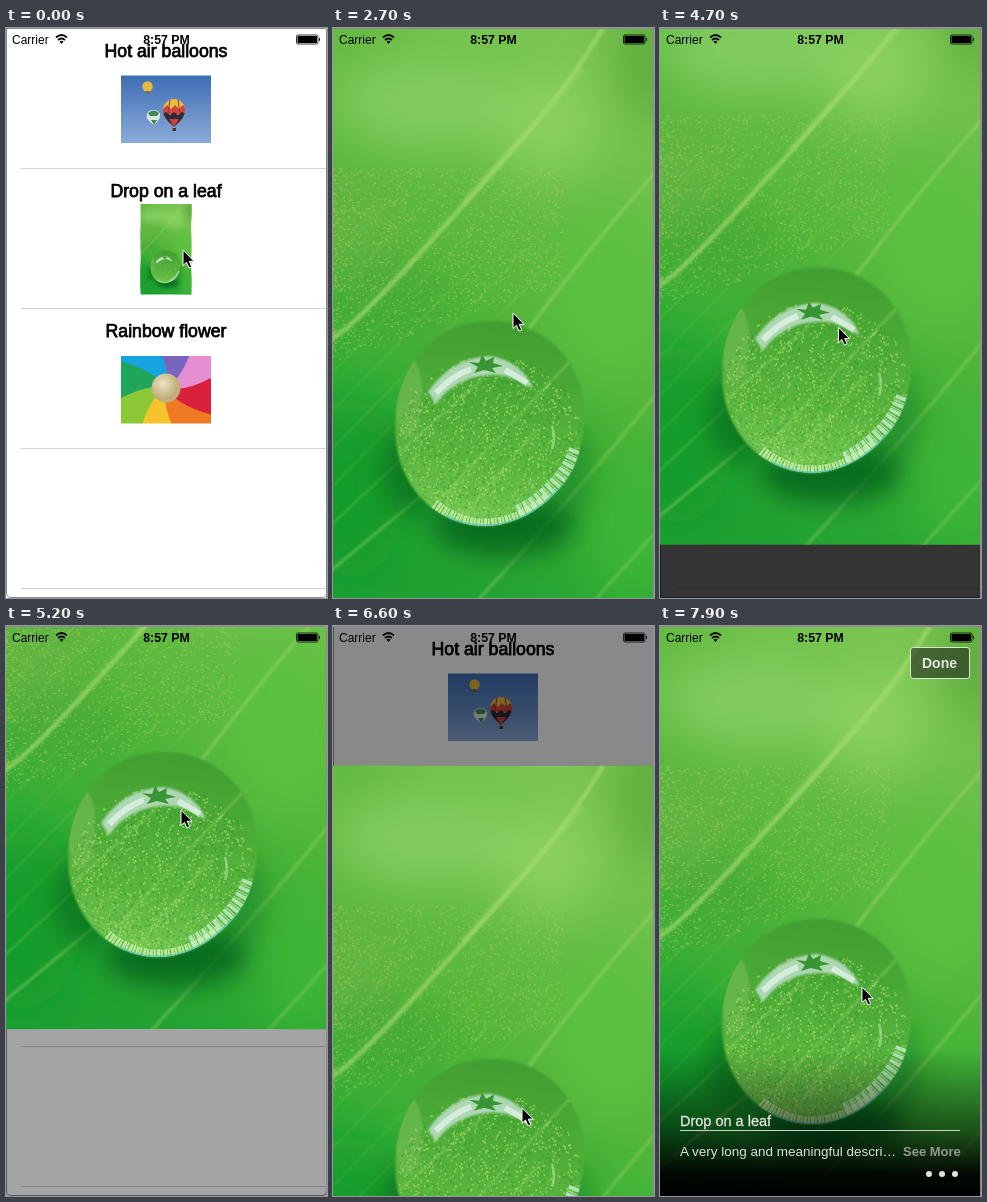
Recreate the animation shown at these times as an HTML page. Size 321x570 px, loop 8000 ms.

```html
<!DOCTYPE html>
<html lang="en">
<head>
<meta charset="utf-8">
<title>Photo viewer</title>
<style>
html, body { margin: 0; height: 100%; overflow: hidden; background: #fff; }
svg { display: block; width: 100vw; height: 100vh; }
text { font-family: "Liberation Sans", Arial, sans-serif; }
.row { font-size: 17.7px; text-anchor: middle; stroke: #000; stroke-width: .75px; }
.bold { font-weight: bold; }
</style>
</head>
<body>
<svg viewBox="0 0 321 570">
  <defs>
    <clipPath id="page"><rect width="320" height="570"/></clipPath>
    <clipPath id="sky"><rect x="115" y="47.5" width="90" height="67.5"/></clipPath>
    <clipPath id="wheelBox"><rect x="115" y="328" width="90" height="67.5"/></clipPath>
    <path id="drop" d="M157 293C213 293 251 335 251 385C251 425 240 450 215 472C195 490 170 499 148 498C100 495 62 455 62 400C62 340 100 293 157 293"/>
    <clipPath id="dropClip"><use href="#drop"/></clipPath>
    <clipPath id="bigBalloon"><path d="M168 99Q156 89 157 82A11 11 0 0 1 179 82Q180 89 168 99"/></clipPath>
    <filter id="soft" x="-50%" y="-50%" width="200%" height="200%"><feGaussianBlur stdDeviation="24"/></filter>
    <filter id="shadow" x="-50%" y="-50%" width="200%" height="200%"><feGaussianBlur stdDeviation="13"/></filter>
    <filter id="mild" x="-50%" y="-50%" width="200%" height="200%"><feGaussianBlur stdDeviation="1.3"/></filter>
    <linearGradient id="green" x1=".7" y1="0" x2=".35" y2="1">
      <stop stop-color="#7cc652"/><stop offset=".45" stop-color="#58b83c"/>
      <stop offset=".75" stop-color="#34ad35"/><stop offset="1" stop-color="#1fa032"/>
    </linearGradient>
    <linearGradient id="water" x1=".55" y1="0" x2=".45" y2="1">
      <stop stop-color="#429e30"/><stop offset=".3" stop-color="#4aa936"/>
      <stop offset=".7" stop-color="#5ab63f"/><stop offset="1" stop-color="#74c855"/>
    </linearGradient>
    <linearGradient id="blue" x2="0" y2="1"><stop stop-color="#3d6db4"/><stop offset="1" stop-color="#8cacd8"/></linearGradient>
    <linearGradient id="shade" x2="0" y2="1">
      <stop stop-opacity="0"/><stop offset=".55" stop-opacity=".55"/>
      <stop offset=".85" stop-opacity=".95"/><stop offset="1"/>
    </linearGradient>
    <radialGradient id="ball" cx=".4" cy=".35"><stop stop-color="#ece3c4"/><stop offset="1" stop-color="#c2ae7c"/></radialGradient>

    <g id="leaf" clip-path="url(#page)">
      <rect width="320" height="570" fill="url(#green)"/>
      <g id="patches" filter="url(#soft)"></g>
      <g id="veins" fill="none" stroke="#a2da70" filter="url(#mild)"></g>
      <path id="grain" stroke="#b4cc62" stroke-width="1.200" opacity=".6"/>
      <g fill="#005f16" filter="url(#shadow)">
        <ellipse cx="170" cy="497" rx="72" ry="32" opacity=".8"/>
        <ellipse cx="80" cy="440" rx="32" ry="48" opacity=".6"/>
        <ellipse cx="238" cy="440" rx="22" ry="45" opacity=".35"/>
      </g>
      <use href="#drop" fill="url(#water)" filter="url(#mild)"/>
      <g clip-path="url(#dropClip)">
        <ellipse cx="76" cy="370" rx="14" ry="40" fill="#74bd58" opacity=".6" filter="url(#mild)"/>
        <g fill="none" stroke="#9bdc68" stroke-width="3" opacity=".35" filter="url(#mild)">
          <path d="M240 330L90 490M205 400L130 490M150 350L66 425"/>
        </g>
        <path id="dents" stroke="#318f2a" stroke-width="1.800" opacity=".5"/>
        <path id="bubbles" stroke="#bde06e" stroke-width="1.800" opacity=".65"/>
        <path d="M249 424C240 448 230 458 215 472Q203 483 187 490" fill="none" stroke="#cdf3d8" stroke-width="27" stroke-dasharray="4 2 1 1" opacity=".75"/>
        <path d="M215 472C195 490 170 499 148 498Q125 497 100 478" fill="none" stroke="#d6f4b8" stroke-width="15" stroke-dasharray="3 1.500 2 1" opacity=".75"/>
        <path d="M249 420C240 450 230 458 215 472C195 490 170 499 148 498Q130 497 112 488" fill="none" stroke="#5cc6c4" stroke-width="2.500"/>
      </g>
      <path d="M95 364Q118 330 157 328Q188 333 200 360L194 358Q178 345 154 347Q120 351 103 376Z" fill="#aed8b4" filter="url(#mild)"/>
      <path d="M103 365Q120 347 138 341M172 342L194 355" stroke="#e6f7ec" stroke-width="6" fill="none" opacity=".7"/>
      <path d="M136 334l10 1 3-8 4 6 8-4-1 6 10 3-11 2 4 5-12-3-10 3 4-6z" fill="#379532"/>
      <path d="M219 398Q223 410 219 421" fill="none" stroke="#a6dd94" stroke-width="2.500" opacity=".7"/>
    </g>
  </defs>

  <rect width="321" height="570" fill="#fff"/>
  <g id="list">
    <text class="row" x="160" y="29">Hot air balloons</text>
    <text class="row" x="160" y="169">Drop on a leaf</text>
    <text class="row" x="160" y="309">Rainbow flower</text>
    <path d="M15 140.5H320M15 280.5H320M15 420.5H320M15 560.5H320" stroke="#d2d2d4"/>
    <g clip-path="url(#sky)">
      <rect x="115" y="47" width="90" height="69" fill="url(#blue)"/>
      <circle cx="141.500" cy="58.500" r="5.200" fill="#e8b93a"/>
      <path d="M140 63h3l-.5 3h-2z" fill="#7a6030"/>
      <path d="M148 97Q139 91 141 86A7 6.500 0 0 1 154 86Q155 91 148 97" fill="#dce8dc"/>
      <path d="M142 85q6-5 11 0l-2 3h-7zM145 92h6l-3 5z" fill="#3f8a58"/>
      <g clip-path="url(#bigBalloon)">
        <rect x="156" y="70" width="24" height="30" fill="#e9bd3c"/>
        <path d="M157 81l4-4 4 4 4-4 4 4 4-4 4 4v5h-24z" fill="#d0453c"/>
        <path d="M156 86l4-2 4 3 4-3 4 3 4-3 4 2v14h-24z" fill="#30283c"/>
        <path d="M163 91l5 8 5-8" fill="#c8443c"/>
        <path d="M164 71l-2 15M172 71l2 15" stroke="#8b344c"/>
      </g>
      <rect x="166.500" y="100" width="3.500" height="3" fill="#4a3424"/>
    </g>
    <use href="#leaf" transform="translate(134.500 176) scale(.159)"/>
    <g clip-path="url(#wheelBox)">
      <g id="wheel"></g>
      <circle cx="160" cy="360" r="14.500" fill="url(#ball)"/>
    </g>
    <path d="M.5 0V565Q.5 569.500 5 569.500H316Q320.500 569.500 320.500 565" fill="none" stroke="#8d8892"/>
  </g>

  <rect id="dim" width="321" height="570"/>
  <use id="photo" href="#leaf"/>

  <g id="chrome">
    <rect y="425" width="320" height="145" fill="url(#shade)"/>
    <rect x="250.500" y="21.500" width="59" height="31" rx="2.500" fill="#1c1c1c" fill-opacity=".55" stroke="#d8e4d4"/>
    <text class="bold" x="279.500" y="42" font-size="14" text-anchor="middle" fill="#e2e6e0">Done</text>
    <text x="20" y="500" font-size="14.500" fill="#e4e8e2" stroke="#e4e8e2" stroke-width=".3">Drop on a leaf</text>
    <path d="M20 504.500H300" stroke="#ccd2ca"/>
    <text x="20" y="530" font-size="13.500" fill="#dde0dc">A very long and meaningful descri…</text>
    <text class="bold" x="243" y="530" font-size="13" fill="#949a92">See More</text>
    <g fill="#e2e2e2"><circle cx="269" cy="548" r="3"/><circle cx="282" cy="548" r="3"/><circle cx="295" cy="548" r="3"/></g>
  </g>

  <g id="statusBar">
    <text x="6" y="16" font-size="12">Carrier</text>
    <text class="bold" x="160.500" y="16" font-size="12.300" text-anchor="middle">8:57 PM</text>
    <g fill="none" stroke="#000" stroke-width="1.700"><path d="M50 9.500Q55.500 4.500 61 9.500M52 12Q55.500 9 59 12"/></g>
    <path d="M53.500 13.500q2-1.500 4 0l-2 2.500z"/>
    <rect x="290.500" y="7" width="21.500" height="9" rx="1.500" fill="none" stroke="#000" stroke-width=".8"/>
    <rect x="291.500" y="8" width="19.500" height="7" rx=".6"/>
    <path d="M313 9.500q2 2 0 4z"/>
  </g>
  <path d="M0 .5H320.500V570" fill="none" stroke="#8d8892"/>
  <path id="cursor" d="M0 0V15.500L3.500 12.300 6 18 8.700 16.800 6.200 11.300H11Z" stroke="#fff"/>
</svg>

<script>
const LOOP = 8000;
const $ = id => document.getElementById(id);

let seed = 7;
const random = () => (seed = seed * 16807 % 2147483647) / 2147483647;

function add(parent, tag, attributes) {
  const node = document.createElementNS("http://www.w3.org/2000/svg", tag);
  for (const name in attributes) node.setAttribute(name, attributes[name]);
  $(parent).append(node);
}

const patch = (cx, cy, rx, ry, fill) => add("patches", "ellipse", { cx, cy, rx, ry, fill, opacity: .8 });
patch(90, 75, 90, 45, "#8bd068");
patch(215, 95, 55, 55, "#90d466");
patch(315, 30, 35, 70, "#55a838");
patch(20, 10, 60, 15, "#58b53a");
patch(20, 195, 60, 50, "#66b444");
patch(60, 270, 60, 35, "#45a835");
patch(275, 265, 55, 90, "#5cc240");
patch(15, 460, 60, 90, "#159c2e");
patch(300, 500, 40, 80, "#3fb838");

const vein = (d, width, opacity) => add("veins", "path", { d, "stroke-width": width, opacity });
vein("M270 0Q240 50 205 92T90 222T-5 312", 5, .65);
vein("M250 40Q190 110 130 175", 7, .3);
vein("M322 145Q260 215 195 302", 4, .4);
vein("M322 368Q240 470 145 572", 4, .32);
vein("M322 505L262 572", 4, .28);
vein("M100 458L-5 545", 3, .4);
vein("M75 425L-5 500", 2, .3);
for (let i = 0; i < 7; i++) vein(`M${60 + i * 28} ${170 + i * 9}L-5 ${235 + i * 38}`, 1.5, .2);

function scatter(id, count, place) {
  let d = "";
  while (count--) {
    const [x, y] = place();
    d += `M${x.toFixed(1)} ${y.toFixed(1)}h1.5`;
  }
  $(id).setAttribute("d", d);
}
function insideDrop() {
  const angle = random() * 2 * Math.PI, radius = Math.sqrt(random());
  return [157 + 92 * radius * Math.cos(angle), 412 + 84 * radius * Math.sin(angle)];
}
scatter("grain", 1500, () => {
  const x = 230 * random() ** 1.4;
  return [x, 140 + random() * (195 - x * .35)];
});
scatter("dents", 700, insideDrop);
scatter("bubbles", 850, insideDrop);

// Curved pinwheel petals, clockwise from the upper right.
const petals = ["#e58fd2", "#d81f3c", "#ee7a22", "#f6c32c", "#8cc836", "#1fa65a", "#16a3e0", "#7865bd"];
petals.forEach((fill, i) => {
  const point = (angle, radius) => {
    const a = angle * Math.PI / 180;
    return `${160 + radius * Math.cos(a)} ${360 + radius * Math.sin(a)}`;
  };
  const start = i * 45 - 65, end = start + 46;
  add("wheel", "path", {
    fill,
    d: `M160 360Q${point(start + 35, 25)} ${point(start, 75)}L${point(end, 75)}Q${point(end + 35, 25)} 160 360`
  });
});

// Eased value between [time, value] keys.
function track(t, keys) {
  const next = keys.findIndex(key => key[0] > t);
  if (next < 0) return keys[keys.length - 1][1];
  if (next === 0) return keys[0][1];
  const [t0, v0] = keys[next - 1], [t1, v1] = keys[next];
  const u = (t - t0) / (t1 - t0);
  return v0 + (v1 - v0) * u * u * (3 - 2 * u);
}

const zoomKeys = [[50, 0], [550, 1]];
const chromeKeys = [[450, 0], [700, 1], [1650, 1], [2000, 0], [3200, 0], [3500, 1], [4350, 1], [4600, 0], [7450, 0], [7750, 1]];
const dragKeys = [[4400, 0], [5200, -167], [6000, 128], [6400, 140], [6580, 140], [7480, 0]];
const cursorX = [[2300, 177], [2700, 180], [4400, 180], [5200, 175], [6000, 189], [6700, 189], [7800, 202]];
const cursorY = [[2300, 222], [2700, 285], [3600, 285], [4100, 353], [4400, 353], [5200, 184], [6000, 484], [6580, 482], [7480, 361]];

function draw(t) {
  const zoom = track(t, zoomKeys), drag = track(t, dragKeys);
  const mix = (a, b) => a + (b - a) * zoom;
  $("photo").setAttribute("transform",
    `translate(${mix(134.5, 0)} ${mix(176, drag)}) scale(${mix(.159, 1)})`);
  $("photo").setAttribute("visibility", zoom ? "visible" : "hidden");
  $("dim").setAttribute("opacity", zoom * (1 - Math.abs(drag) / 260));
  $("chrome").setAttribute("opacity", track(t, chromeKeys));
  $("cursor").setAttribute("transform", `translate(${track(t, cursorX)} ${track(t, cursorY)})`);
}

const began = performance.now();
function frame() {
  draw((performance.now() - began) % LOOP);
  requestAnimationFrame(frame);
}
frame();
</script>
</body>
</html>
```
